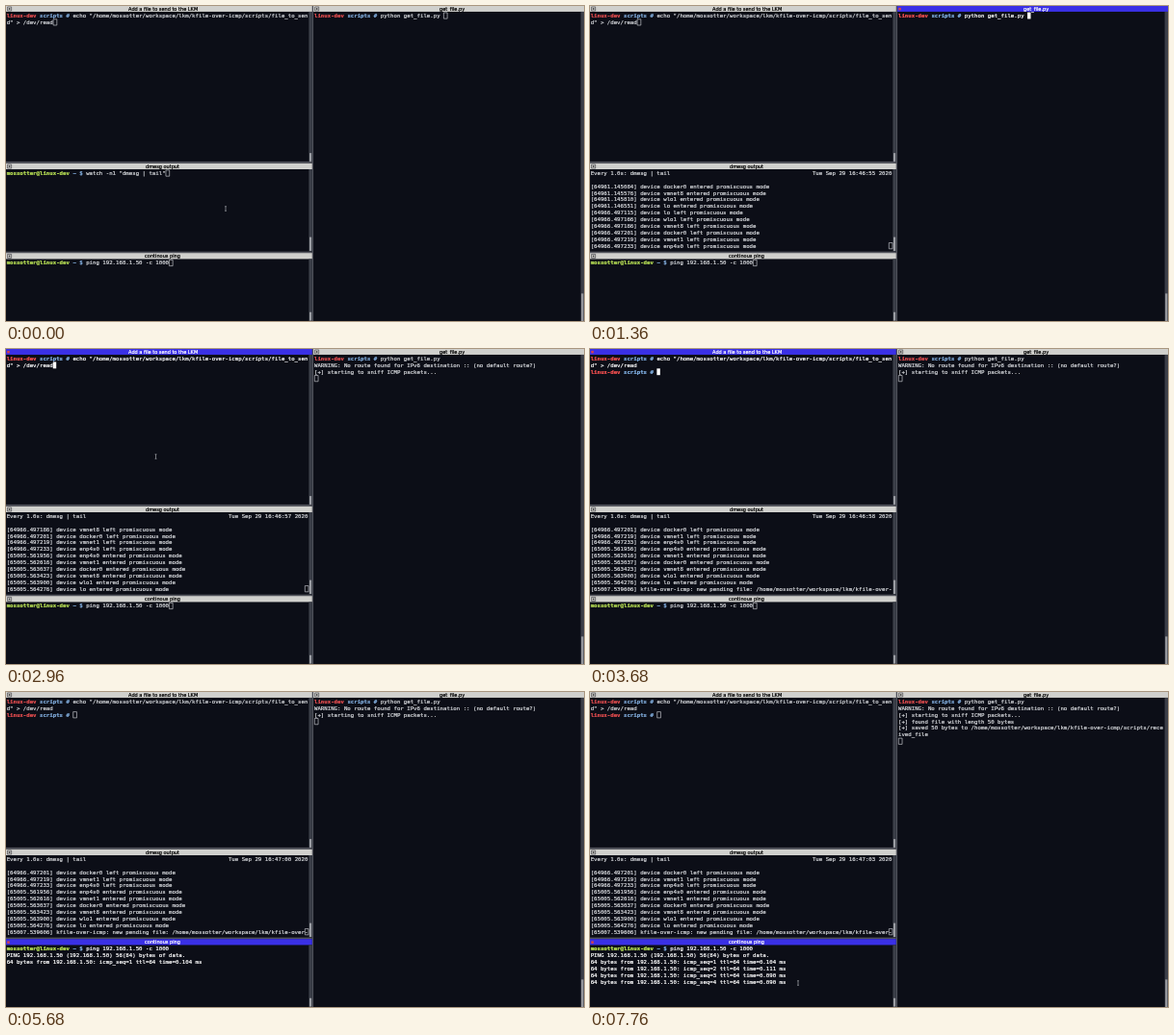
Recreate the animation shown at these times as an HTML page with a canvas. Size 600 px wide and 328 px high, loop 8 s.

```html
<!DOCTYPE html>
<html lang="en">
<head>
<meta charset="utf-8">
<title>Terminal session</title>
<style>
  html, body { margin: 0; width: 100%; height: 100%; overflow: hidden; background: #0c0e17; }
  canvas { display: block; width: 600px; height: 328px; }
</style>
</head>
<body>
<canvas id="stage"></canvas>
<script>
const LOOP = 8000, STEP = 80;
const COL = 11, ROW = 22;           // character cell on a 1920 px wide desktop
const BG = '#0c0e17', BAR = '#d0d0cd', FOCUS = '#3a30e6';
const SASH = '#50525b', TROUGH = '#3c3f49', THUMB = '#9b9da3';
const MONO = '18.27px "DejaVu Sans Mono", monospace';
const SANS = '16px "DejaVu Sans", sans-serif';
const HOME = '/home/mossotter/workspace/lkm/kfile-over-';

const canvas = document.getElementById('stage');
const ctx = canvas.getContext('2d');
const dpr = window.devicePixelRatio || 1;
canvas.width = 600 * dpr;
canvas.height = 328 * dpr;
const scale = dpr * 600 / 1920;

const panes = {
  file:  { x: 0, y: -1, w: 1017, h: 519, mid: 522, title: 'Add a file to send to the LKM', thumb: [490, 28] },
  dmesg: { x: 0, y: 524, w: 1017, h: 294, mid: 520, title: 'dmesg output', thumb: [770, 46] },
  ping:  { x: 0, y: 823, w: 1017, h: 227, mid: 520, title: 'continous ping', thumb: [1020, 28] },
  get:   { x: 1021, y: -1, w: 899, h: 1051, mid: 1482, title: 'get_file.py', thumb: [958, 92] }
};

const within = (t, ...spans) => spans.some(([a, b]) => t >= a && t < b);

// Last value whose start time has passed
const pick = (t, list) => list.reduce((v, [at, next]) => t >= at ? next : v, null);

function box(x, y, w, h, color) {
  ctx.fillStyle = color;
  ctx.fillRect(x, y, w, h);
}

// A thin outline keeps the strokes solid at this small size
function write(str, x, y, font, color) {
  ctx.font = font;
  ctx.fillStyle = ctx.strokeStyle = color;
  ctx.lineWidth = 0.7;
  ctx.lineJoin = 'round';
  ctx.fillText(str, x, y);
  ctx.strokeText(str, x, y);
}

function drawBar(p, on) {
  box(p.x, p.y, p.w, 20, on ? FOCUS : BAR);
  if (on) {
    box(p.x + 4, p.y + 7, 8, 8, '#d8414b');
  } else {
    ctx.strokeStyle = '#3a3b40';
    ctx.lineWidth = 2;
    ctx.strokeRect(p.x + 5, p.y + 4, 13, 13);
    box(p.x + 9, p.y + 8, 5, 5, '#333');
  }
  ctx.textAlign = 'center';
  write(p.title, p.mid, p.y + 15.5, SANS, on ? '#fff' : '#000');
  ctx.textAlign = 'left';
}

function drawPane(p, on) {
  const left = p === panes.get ? 1024 : 2, top = p.y + 22;
  const ink = on ? '#ffffff' : '#d2d4d8';
  const red = on ? '#ff5252' : '#e84e50';
  const green = on ? '#c5f35a' : '#bbe455';
  const blue = on ? '#84b5ea' : '#80acdc';
  drawBar(p, on);
  box(p.x + p.w - 11, p.y + 20, 11, p.h - 20, TROUGH);
  box(p.x + p.w - 9, p.thumb[0], 7, p.thumb[1], THUMB);

  const put = (row, col, str, color = ink, bold = false) =>
    write(str, left + col * COL, top + row * ROW + 17, (bold ? 'bold ' : '') + MONO, color);
  return {
    put,
    root(row, cmd = '') {
      put(row, 0, 'linux-dev', red, true);
      put(row, 10, 'scripts #', blue, true);
      put(row, 20, cmd);
    },
    user(row, cmd) {
      put(row, 0, 'mossotter@linux-dev', green, true);
      put(row, 20, '~ $', blue, true);
      put(row, 24, cmd);
    },
    cursor(row, col, lit) {
      const x = left + col * COL, y = top + row * ROW;
      if (!on) {
        ctx.strokeStyle = '#d2d4d8';
        ctx.lineWidth = 2;
        ctx.strokeRect(x + 1, y + 1, COL + 1, ROW - 2);
      } else if (lit) {
        box(x, y, COL, ROW, '#fff');
      }
    }
  };
}

const log = [
  ...['145084 docker0', '145576 vmnet8', '145810 wlo1', '146551 lo'].map(s => ['64961.', s, 'entered']),
  ...['497115 lo', '497166 wlo1', '497186 vmnet8', '497201 docker0', '497219 vmnet1', '497233 enp4s0']
    .map(s => ['64966.', s, 'left']),
  ...['561956 enp4s0', '562616 vmnet1', '563037 docker0', '563423 vmnet8', '563900 wlo1', '564276 lo']
    .map(s => ['65005.', s, 'entered'])
].map(([sec, s, verb]) => {
  const [frac, dev] = s.split(' ');
  return `[${sec}${frac}] device ${dev} ${verb} promiscuous mode`;
});
log.push('[65007.539606] kfile-over-icmp: new pending file: ' + HOME);

function drawFile(t, on) {
  const p = drawPane(panes.file, on);
  p.root(0, `echo "${HOME}icmp/scripts/file_to_sen`);
  p.put(1, 0, 'd" > /dev/read');
  if (t < 3600) {
    p.cursor(1, 14, t < 3440);
  } else {
    p.root(2);
    p.cursor(2, 20, t < 4080);
  }
}

function drawDmesg(t, on) {
  const p = drawPane(panes.dmesg, on);
  if (t < 400) {
    p.user(0, 'watch -n1 "dmesg | tail"');
    if (t < 240) p.cursor(0, 48, true);
    else p.cursor(1, 0, true);
    return;
  }
  // The replay runs a little faster than the clock it shows
  const sec = 54 + Math.floor((t - 400 + 60) / 818);
  const clock = `16:${46 + Math.floor(sec / 60)}:${String(sec % 60).padStart(2, '0')}`;
  p.put(0, 0, 'Every 1.0s: dmesg | tail');
  p.put(0, 67, `Tue Sep 29 ${clock} 2020`);
  const first = pick(t, [[0, 0], [2880, 6], [3680, 7]]);
  log.slice(first, first + 10).forEach((line, i) => p.put(2 + i, 0, line));
  if (!within(t, [3680, 3760])) p.cursor(11, 90, t < 720);
}

function drawPing(t, on) {
  const p = drawPane(panes.ping, on);
  p.user(0, 'ping 192.168.1.50 -c 1000');
  if (t < 5200) {
    p.cursor(0, 49, t < 5120);
    return;
  }
  p.put(1, 0, 'PING 192.168.1.50 (192.168.1.50) 56(84) bytes of data.');
  const replies = [[5200, '0.104'], [6080, '0.111'], [6880, '0.090'], [7600, '0.090']]
    .filter(([at]) => t >= at);
  replies.forEach(([, ms], i) =>
    p.put(2 + i, 0, `64 bytes from 192.168.1.50: icmp_seq=${i + 1} ttl=64 time=${ms} ms`));
  const lit = Math.floor((t - 5200) / 480) % 2 === 0;
  p.cursor(2 + replies.length, 0, lit);
}

function drawGet(t, on) {
  const p = drawPane(panes.get, on);
  p.root(0, 'python get_file.py');
  const out = [
    [2160, 'WARNING: No route found for IPv6 destination :: (no default route?)'],
    [2400, '[+] starting to sniff ICMP packets...'],
    [6160, '[+] found file with length 50 bytes'],
    [6960, `[+] saved 50 bytes to ${HOME}icmp/scripts/rece`],
    [6960, 'ived_file']
  ].filter(([at]) => t >= at);
  out.forEach(([, line], i) => p.put(1 + i, 0, line));
  if (t < 2000) p.cursor(0, 39, t < 1680);
  else p.cursor(1 + out.length, 0, t < 2400);
}

function glide(t, t0, t1, a, b, bend) {
  const k = Math.min(1, Math.max(0, (t - t0) / (t1 - t0)));
  const e = k * k * (3 - 2 * k);
  return [a[0] + (b[0] - a[0]) * e + bend * Math.sin(Math.PI * e), a[1] + (b[1] - a[1]) * e];
}

function drawPointer(t) {
  if (within(t, [240, 560], [1360, 2000], [3600, 4000], [5200, 6240], [6880, 7280], [7600, 7760])) return;
  const start = [228, 211], right = [388, 158], upper = [155.5, 112], lower = [216, 303];
  let pos = start;
  if (t >= 4000) pos = glide(t, 3920, 4640, upper, lower, 20);
  else if (t >= 2000) pos = glide(t, 1920, 2480, right, upper, 0);
  else if (t >= 720) pos = right;
  const x = pos[0] * 3.2, y = pos[1] * 3.2;
  box(x - 1, y - 7, 2, 14, '#b4b6bb');
  for (const end of [-8, 6]) box(x - 3, y + end, 6, 2, '#b4b6bb');
}

function draw(t) {
  ctx.setTransform(scale, 0, 0, scale, 0, 0);
  box(0, 0, 1920, 1050, BG);
  box(1017, 0, 4, 1050, SASH);
  for (const y of [518, 818]) box(0, y, 1017, 5, SASH);
  const focus = pick(t, [[0, ''], [80, 'dmesg'], [1200, 'get'], [2880, 'file'], [4480, 'ping']]);
  drawFile(t, focus === 'file');
  drawDmesg(t, focus === 'dmesg');
  drawPing(t, focus === 'ping');
  drawGet(t, focus === 'get');
  drawPointer(t);
}

const began = performance.now();
function frame() {
  const t = (performance.now() - began) % LOOP;
  draw(Math.floor(t / STEP) * STEP);
  requestAnimationFrame(frame);
}
frame();
</script>
</body>
</html>
```
